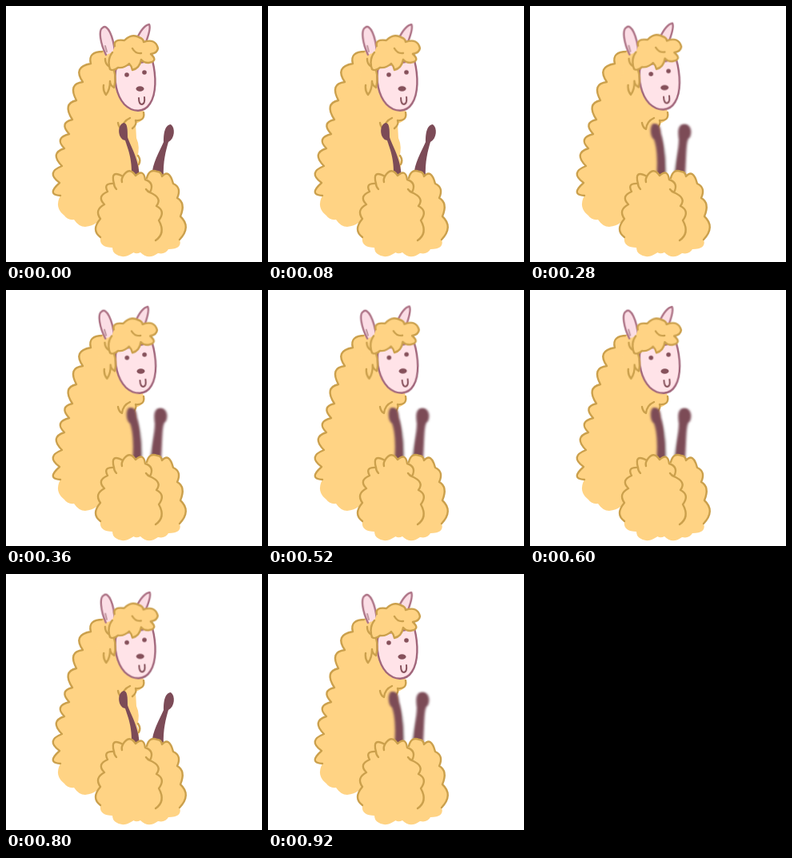
Write an HTML page without scripts that moves like this. It is 320 by 320 pixels and loops after 960 ms.

```html
<!DOCTYPE html>
<html lang="en">
<head>
<meta charset="utf-8">
<title>Clapping llama</title>
<style>
html, body { margin: 0; width: 100%; height: 100%; overflow: hidden; background: #fff; }
svg { display: block; width: 100vw; height: 100vh; }
path { stroke-linecap: round; stroke-linejoin: round; }
.wool { fill: #ffd384; }
.curl { fill: none; stroke: #cba04c; stroke-width: 2.4; }
.skin { fill: #ffe3e8; stroke: #a0657a; stroke-width: 2.4; }
.ear .skin { fill: #fbdde5; stroke: #ad7386; }
.leg { fill: #7c4b57; }
.mark { fill: #85505a; }
.line { fill: none; stroke: #85505a; stroke-width: 2; }

.head { transform-origin: 120px 78px; animation: nod .96s ease-in-out infinite; }
.ear { animation: twitch .96s linear infinite; }
.left { transform-origin: 130px 60px; }
.right { transform-origin: 169px 44px; }
.open, .closed { animation: clap .08s step-end infinite; }
.closed { animation-delay: -.04s; }

@keyframes nod {
  0%, 100% { transform: rotate(0); }
  50% { transform: rotate(-2.7deg); }
}
@keyframes twitch {
  0%, 100% { transform: rotate(0); }
  17% { transform: rotate(3deg); }
  37% { transform: rotate(1.5deg); }
  54% { transform: rotate(1deg); }
  71%, 83% { transform: rotate(3.5deg); }
  96% { transform: rotate(.7deg); }
}
@keyframes clap {
  0% { visibility: visible; }
  50%, 100% { visibility: hidden; }
}
</style>
</head>
<body>
<svg viewBox="0 0 320 320">
  <defs>
    <filter id="blur" x="-30%" y="-20%" width="160%" height="140%"><feGaussianBlur stdDeviation="1.7 1"/></filter>
    <path id="back" d="M121 57Q102 57 106 72Q83 76 96 95Q77 97 88 118Q70 122 83 142Q66 146 79 160Q60 165 73 178Q54 184 70 200Q49 208 67 221Q50 236 68 237"/>
    <path id="hip" d="M176 215Q179 203 189 207Q194 207 195 213Q204 203 209 222Q220 227 214 240Q225 246 218 263Q232 276 217 292"/>
    <path id="haunch" d="M118 289Q106 280 118 266Q110 255 123 248Q113 238 127 232Q121 221 135 222Q130 204 146 213Q154 200 162 212Q172 203 174 217Q186 221 180 233Q196 240 188 250Q200 256 191 268Q200 284 187 293"/>
    <path id="fringe" d="M136 50Q134 41 148 43Q157 34 166 39Q172 41 172 45Q187 40 190 53Q189 59 181 60Q191 69 178 71Q172 71 169 67Q167 78 158 80Q157 75 154 72Q148 78 140 77Q134 82 130 79Q126 67 133 58"/>
  </defs>

  <!-- body -->
  <path class="wool" d="M121 57Q102 57 106 72Q83 76 96 95Q77 97 88 118Q70 122 83 142Q66 146 79 160Q60 165 73 178Q54 184 70 200Q49 208 67 221Q50 236 68 237Q60 252 73 262Q77 268 85 267Q91 276 99 276Q108 275 113 271L140 285L163 212Q169 197 164 190Q168 176 163 165L162 147Q174 143 172 133L160 80Z"/>
  <use href="#back" class="curl"/>
  <path class="curl" d="M172 133Q174 144 162 143Q164 148 158 153M155 140Q146 144 145 154Q141 152 140 146M165 187Q169 193 166 198"/>

  <!-- head -->
  <g class="head">
    <path class="wool" d="M121 57L136 48L165 42L165 80L140 112L112 100Z"/>
    <g class="ear left">
      <path class="skin" d="M125 61C118 47 115 30 121 27C127 22 134 38 136 57"/>
      <path class="line" stroke-width="1" opacity=".5" d="M124 50L126 57"/>
    </g>
    <g class="ear right"><path class="skin" d="M163 42C167 33 173 24 179 23C181 27 178 37 175 45"/></g>
    <path class="skin" d="M138 76C134 92 138 112 148 123C159 134 173 133 180 122C188 110 188 88 183 68Z"/>
    <use href="#fringe" class="wool"/>
    <use href="#fringe" class="curl"/>
    <path class="curl" d="M135 80Q138 91 135 102Q130 99 130 94Q130 105 125 111Q121 106 122 99M158 53Q162 60 169 59M124 66Q124 72 128 75"/>
    <circle class="mark" cx="151" cy="86" r="2.8"/>
    <circle class="mark" cx="173" cy="83" r="2.8"/>
    <ellipse class="mark" cx="167.500" cy="103.500" rx="5" ry="3.200"/>
    <path class="line" d="M166 115Q166 123 170 123Q174 122 173 114"/>
  </g>

  <!-- front legs -->
  <g class="leg open">
    <path d="M147 146C152 146 152 155 152 164C155 174 166 190 167 214H157C158 190 152 178 149 168C140 167 138 149 147 146Z"/>
    <path d="M206 148C212 152 211 166 203 170C200 180 196 195 197 214H182C183 195 192 182 197 170C197 160 198 149 206 148Z"/>
  </g>
  <g class="leg closed" filter="url(#blur)">
    <path fill="#fff" d="M169 148H181V212H169Z"/>
    <path d="M154 147C162 146 163 152 164 160C168 172 171 190 170 214H158C160 190 158 175 155 167C149 162 150 149 154 147Z"/>
    <path d="M190 148C199 145 204 155 200 164C195 167 196 178 194 214H180C181 195 186 180 186 167C185 160 184 151 190 148Z"/>
  </g>

  <!-- hind wool -->
  <path class="wool" d="M176 215Q179 203 189 207Q194 207 195 213Q204 203 209 222Q220 227 214 240Q225 246 218 263Q232 276 217 292Q221 304 203 304Q199 311 190 309Q178 318 168 308Q155 315 150 285Z"/>
  <use href="#hip" class="curl"/>
  <path class="wool" d="M118 289Q106 280 118 266Q110 255 123 248Q113 238 127 232Q121 221 135 222Q130 204 146 213Q154 200 162 212Q172 203 174 217Q186 221 180 233Q196 240 188 250Q200 256 191 268Q200 284 187 293L172 308Q164 304 158 309Q146 317 137 310Q133 307 133 302Q116 302 118 289Z"/>
  <use href="#haunch" class="curl"/>
  <path class="curl" d="M135 222Q135 226 138 229M146 213Q144 217 145 220M180 233Q177 232 175 229"/>
</svg>
</body>
</html>
```
